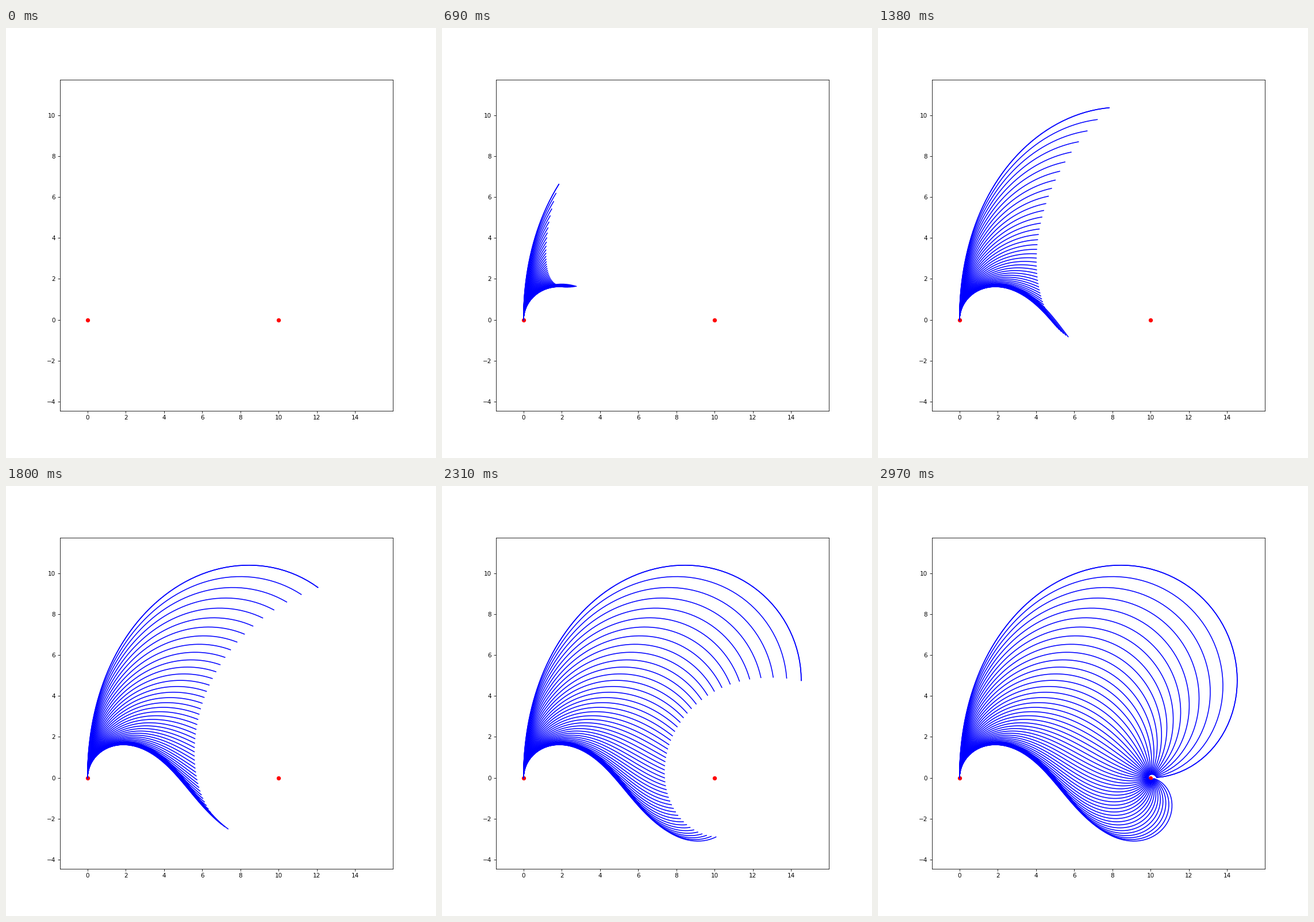
A matplotlib script for the animation above (3 s loop, 748 px wide and 748 px high).

```python
import numpy as np
import matplotlib.pyplot as plt
from matplotlib.animation import FuncAnimation

START_YAW = np.pi / 2
GOAL_X = 10.0
N_PATHS = 50
N_POINTS = 100

# Gauss-Legendre rule on [0, 1]
nodes, weights = np.polynomial.legendre.leggauss(64)
nodes, weights = (nodes + 1) / 2, weights / 2


def heading(a, delta, t):
    return a * t**2 + (delta - a) * t + START_YAW


def solve_sharpness(delta, a):
    """Newton search for the clothoid that ends on the x axis."""
    for _ in range(30):
        yaw = heading(a, delta, nodes)
        g = weights @ np.sin(yaw)
        slope = weights @ ((nodes**2 - nodes) * np.cos(yaw))
        a -= g / slope
    return a


def clothoid(a, delta):
    length = GOAL_X / (weights @ np.cos(heading(a, delta, nodes)))
    u = np.linspace(0, 1, N_POINTS)
    yaw = heading(a, delta, np.outer(u, nodes))
    return length * u * (np.cos(yaw) @ weights), length * u * (np.sin(yaw) @ weights)


def clothoid_family():
    goal_yaws = np.linspace(-np.pi, np.pi, N_PATHS)
    goal_yaws[-1] = -np.pi  # pi wraps around
    a = 3 * (START_YAW + goal_yaws[0])
    paths = []
    for yaw in goal_yaws[:-1]:
        delta = yaw - START_YAW
        a = solve_sharpness(delta, a)  # continue from the neighbouring path
        paths.append(clothoid(a, delta))
    return paths + [paths[0]]


def padded_limits(values):
    low, high = np.min(values), np.max(values)
    pad = 0.1 * (high - low)
    return low - pad, high + pad


paths = clothoid_family()

fig = plt.figure(figsize=(10, 10), dpi=74.8)
ax = fig.add_subplot(
    xlim=padded_limits([x for x, _ in paths]),
    ylim=padded_limits([y for _, y in paths]),
)
ax.plot(0, 0, "ro")
ax.plot(GOAL_X, 0, "ro")
lines = [ax.plot([], [], "b-")[0] for _ in paths]


def animate(i):
    for line, (x, y) in zip(lines, paths):
        line.set_data(x[:i], y[:i])
    return lines


anim = FuncAnimation(fig, animate, frames=N_POINTS, interval=30, repeat_delay=0)
plt.show()
```
